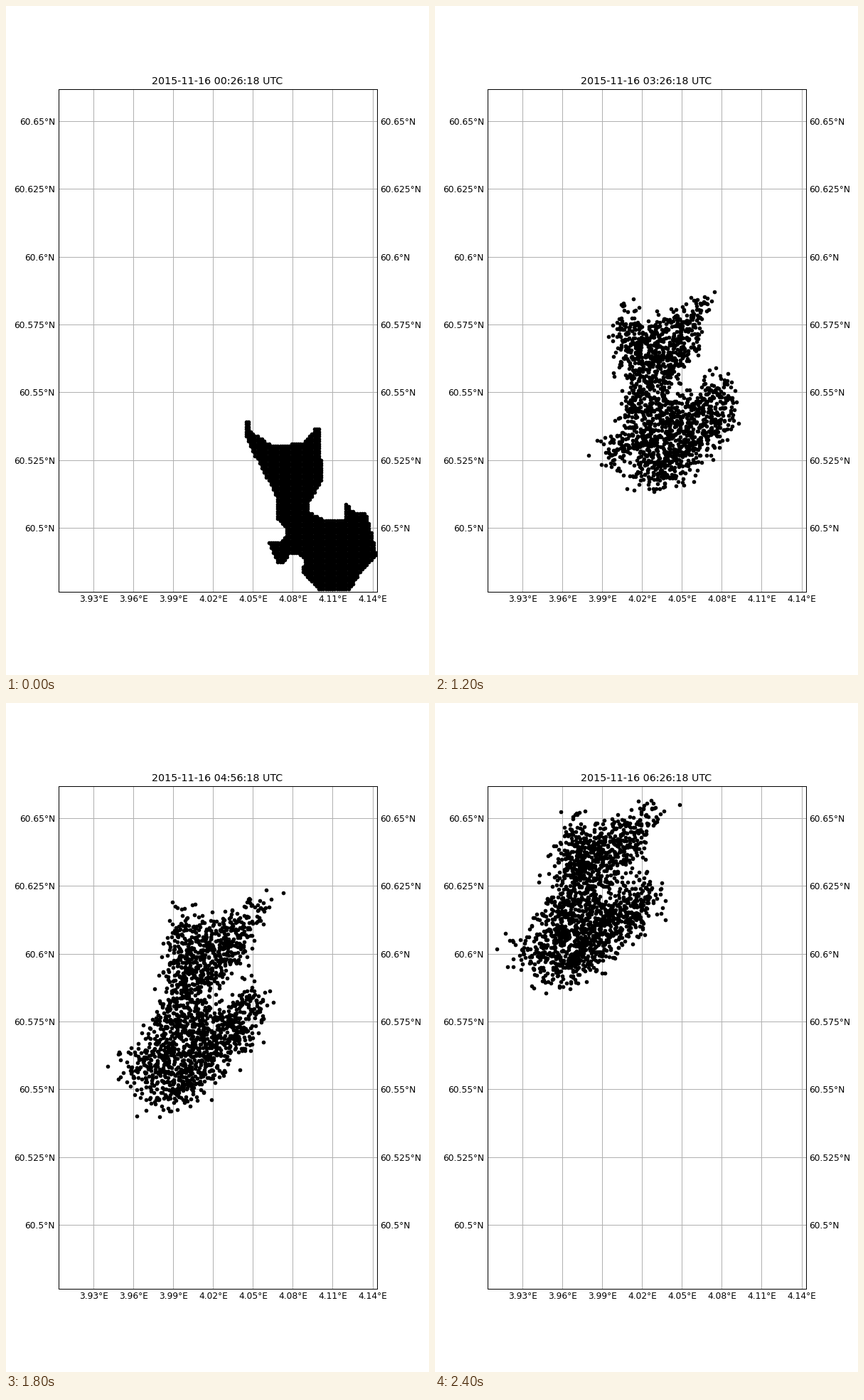
A matplotlib script for the animation above (2500 ms loop, 595x941 px).

```python
import numpy as np
import matplotlib.pyplot as plt
from matplotlib.animation import FuncAnimation
from matplotlib.path import Path

W, H, DPI = 595, 941, 86
LEFT, RIGHT, TOP, BOTTOM = 73.5, 521.5, 117.5, 824
FRAMES, STEPS = 25, 4          # STEPS: frames per hour
SPREAD = 2.5                   # random walk step in px
HAIRLINE = 72 / DPI            # one pixel in points

# Corners of the seeded area, in stage pixels
OUTLINE = [
    (337, 584), (342, 584), (342, 597), (376, 619), (420, 613), (434, 594),
    (443, 595), (440, 632), (446, 646), (446, 663), (427, 697), (427, 711),
    (452, 724), (475, 724), (477, 699), (487, 710), (507, 714), (521, 772),
    (498, 797), (484, 820), (440, 822), (415, 795), (420, 780), (411, 770),
    (398, 771), (391, 783), (382, 783), (369, 754), (391, 751), (395, 736),
    (381, 721), (379, 688), (337, 607)]


def seed_grid():
    x, y = np.meshgrid(np.arange(337.5, 521, 3.2), np.arange(585, 823, 3.4))
    pts = np.column_stack([x.ravel(), y.ravel()])
    return pts[Path(OUTLINE).contains_points(pts)]


def patch_axes(hour):
    """Head of the patch, plus its width and length vectors."""
    tide = np.sin(np.pi * hour / 3)
    grow = 1 - np.exp(-hour)
    head = np.array([389 - 22.5 * hour - 18 * tide,
                     595 - 43.4 * hour - 4.9 * hour**2 + 14 * tide])
    body = np.array([449 - 40.7 * hour + 10 * tide,
                     769 - 32.8 * hour - 6.72 * hour**2 - 10 * tide])
    width = np.array([138 + 22 * grow, 3 - 38 * grow])
    return head, np.array([width, body - head])


start = seed_grid()
head0, axes0 = patch_axes(0)
local = (start - head0) @ np.linalg.inv(axes0)

rng = np.random.default_rng(16)
walk = rng.normal(0, SPREAD, (FRAMES, len(start), 2))
walk[0] = 0
walk = walk.cumsum(axis=0)

plt.rcParams["font.family"] = "DejaVu Sans"
plt.rcParams["axes.linewidth"] = HAIRLINE
fig = plt.figure(figsize=((W + 1e-3) / DPI, (H + 1e-3) / DPI), dpi=DPI,
                 facecolor="white")
ax = fig.add_axes([LEFT / W, 1 - BOTTOM / H,
                   (RIGHT - LEFT) / W, (BOTTOM - TOP) / H])
ax.set_xlim(LEFT, RIGHT)
ax.set_ylim(BOTTOM, TOP)
ax.set_xticks([123.3 + 56.03 * i for i in range(8)],
              [f"{3.93 + 0.03 * i:.2f}°E" for i in range(8)])
ax.set_yticks([733.96 - 95.3 * i for i in range(7)],
              [f"{60.5 + 0.025 * i:g}°N" for i in range(7)])
ax.tick_params(length=0, labelsize=10.3, labelright=True)
ax.tick_params(axis="x", pad=3.5)
ax.tick_params(axis="y", pad=3.8)
ax.grid(color="#b0b0b0", linewidth=HAIRLINE)
ax.set_axisbelow(True)

dots, = ax.plot([], [], "o", color="black", markersize=4.7, markeredgewidth=0)
title = ax.set_title("", fontsize=11.95, pad=6)


def update(k):
    head, axes = patch_axes(k / STEPS)
    pos = head + local @ axes + walk[k]
    dots.set_data(pos[:, 0], pos[:, 1])
    hour, minute = divmod(26 + 15 * k, 60)
    title.set_text(f"2015-11-16 {hour:02d}:{minute:02d}:18 UTC")
    return dots, title


anim = FuncAnimation(fig, update, frames=FRAMES, interval=100,
                     repeat=True, repeat_delay=0, blit=False)
plt.show()
```
